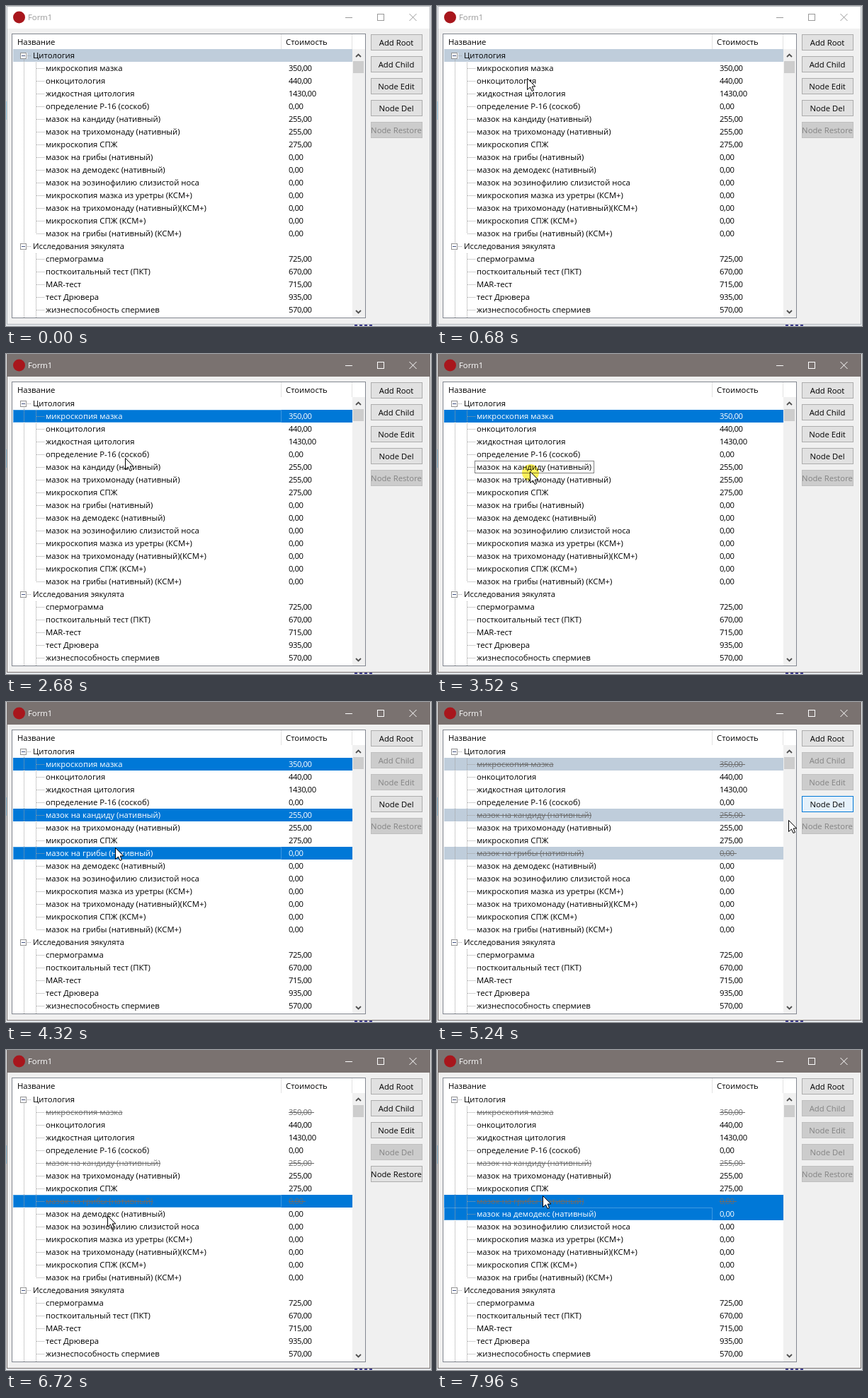
An HTML page with a canvas for the animation above (8 s loop, 600x453 px).

```html
<!DOCTYPE html>
<html lang="ru">
<head>
<meta charset="utf-8">
<title>Form1</title>
<style>
html, body { margin: 0; width: 100%; height: 100%; overflow: hidden; background: #f0f0f0; }
canvas { display: block; }
</style>
</head>
<body>
<canvas id="stage" width="600" height="453"></canvas>
<script>
const ctx = document.getElementById('stage').getContext('2d');
const LOOP = 8000, STEP = 40, HOLD = 80, BLUE = '#0078d7';
const FONT = '500 11.3px "Open Sans", "Noto Sans", sans-serif';

const rows = `Цитология
микроскопия мазка|350,00
онкоцитология|440,00
жидкостная цитология|1430,00
определение Р-16 (соскоб)|0,00
мазок на кандиду (нативный)|255,00
мазок на трихомонаду (нативный)|255,00
микроскопия СПЖ|275,00
мазок на грибы (нативный)|0,00
мазок на демодекс (нативный)|0,00
мазок на эозинофилию слизистой носа|0,00
микроскопия мазка из уретры (КСМ+)|0,00
мазок на трихомонаду (нативный)(КСМ+)|0,00
микроскопия СПЖ (КСМ+)|0,00
мазок на грибы (нативный) (КСМ+)|0,00
Исследования эякулята
спермограмма|725,00
посткоитальный тест (ПКТ)|670,00
MAR-тест|715,00
тест Дрювера|935,00
жизнеспособность спермиев|570,00`.split('\n').map(s => s.split('|'));
const buttons = ['Add Root', 'Add Child', 'Node Edit', 'Node Del', 'Node Restore'];

// Mouse presses; each takes effect on release, HOLD ms later.
const start = { press: -HOLD, rows: [0], blur: true };
const removal = { press: 5000, rows: [1, 5, 8], blur: true };
const acts = [
  start,
  { press: 760, rows: [1] },
  { press: 3520, rows: [1, 5] },
  { press: 4240, rows: [1, 5, 8] },
  removal,
  { press: 5960, rows: [8] },
  { press: 7320, rows: [8, 9] }
];

// Pointer moves: begin, end, x, y, height of the arc
const moves = [
  [360, 720, 128, 90, 0],
  [880, 1080, 143, 147, 0],
  [1960, 2800, 169, 147, 0],
  [2880, 3320, 131, 166, 26],
  [3560, 4080, 134, 214, 0],
  [4240, 4840, 545, 142, 30],
  [5140, 5600, 143, 230, -38],
  [5800, 5960, 146, 213, 0],
  [6120, 6720, 143, 234, 0],
  [7400, 7960, 149, 206, 0]
];

const clamp = k => Math.max(0, Math.min(1, k));
const ease = k => k * k * (3 - 2 * k);
const rowY = i => 70 + 18 * i;

function pointer(t) {
  if (t >= 1080 && t < 1960) { // one sweep around the labels
    const a = (120 + 300 * (t - 1080) / 880) * Math.PI / 180;
    return [158 + 30 * Math.cos(a), 134 + 15 * Math.sin(a)];
  }
  let x = 90, y = 453;
  for (const [t0, t1, toX, toY, arc] of moves) {
    if (t < t0) break;
    const e = ease(clamp((t - t0) / (t1 - t0)));
    x += (toX - x) * e;
    y += (toY - y) * e - arc * Math.sin(Math.PI * e);
  }
  return [x, y];
}

function stateAt(t) {
  const pressed = acts.filter(a => a.press <= t).pop();
  const done = acts.filter(a => a.press + HOLD <= t).pop();
  const removed = t >= removal.press + HOLD ? removal.rows : [];
  const one = done.rows.length === 1;
  const gone = done.press > removal.press && done.rows.some(i => removed.includes(i));
  return {
    t, pressed, done, removed,
    active: pressed !== start,
    lit: !pressed.blur && !done.blur,
    holding: pressed !== done,
    enabled: [true, one, one, !gone, gone && one]
  };
}

function fill(color, x, y, w, h) {
  ctx.fillStyle = color;
  ctx.fillRect(x, y, w, h);
}

function frame(color, x, y, w, h) {
  ctx.strokeStyle = color;
  ctx.strokeRect(x + .5, y + .5, w - 1, h - 1);
}

function line(color, ...pts) {
  ctx.strokeStyle = color;
  ctx.beginPath();
  pts.forEach(([x, y]) => ctx.lineTo(x, y));
  ctx.stroke();
}

function text(s, x, y, color = '#000', align = 'left') {
  ctx.fillStyle = color;
  ctx.textAlign = align;
  ctx.fillText(s, x, y);
}

function dotted(draw) {
  ctx.setLineDash([1, 1]);
  draw();
  ctx.setLineDash([]);
}

function disc(color, x, y, r) {
  ctx.fillStyle = color;
  ctx.beginPath();
  ctx.arc(x, y, r, 0, 7);
  ctx.fill();
}

function drawWindow({ active }) {
  const ink = active ? '#fff' : '#999', bar = active ? '#7a7270' : '#fff';
  fill('#e4e8ec', 0, 0, 600, 453);
  fill('#a9d8f0', 0, 135, 1, 26);
  for (let x = 492; x < 520; x += 7) fill('#404090', x, 451, 4, 2);

  fill('#f0f0f0', 1, 0, 598, 451);
  fill(bar, 1, 0, 598, 32);
  frame(active ? bar : '#b4b8bc', 1, 0, 598, 451);
  disc('#a8161c', 18.5, 16, 8.5);
  text('Form1', 31, 20, ink);
  line(ink, [479, 16.5], [489, 16.5]);
  frame(ink, 524, 11, 10, 10);
  line(ink, [569.5, 11], [579.5, 21]);
  line(ink, [579.5, 11], [569.5, 21]);
}

function drawTreeLines() {
  const gray = '#a0a0a0', roots = [0, 15].map(rowY);
  dotted(() => {
    line(gray, [25.5, 76], [25.5, 441]);
    line(gray, [42.5, 80], [42.5, rowY(14)]);
    line(gray, [42.5, 350], [42.5, 441]);
    rows.forEach(([, price], i) => {
      const x = price ? 43 : 30, y = rowY(i) + .5;
      line(gray, [x, y], [price ? 54 : 36, y]);
    });
  });
  for (const y of roots) {
    fill('#fff', 20, y - 4, 10, 9);
    frame('#919191', 20, y - 4, 9, 9);
    line('#405080', [22, y + .5], [27, y + .5]);
  }
}

function drawRow([name, price], i, color, struck) {
  const y = rowY(i);
  text(name, price ? 56 : 38, y + 4, color);
  if (!price) return;
  ctx.letterSpacing = '-0.4px';
  text(price, 399, y + 4, color);
  ctx.letterSpacing = '0px';
  if (struck) {
    fill(color, 56, y, ctx.measureText(name).width, 1);
    fill(color, 399, y, price.length * 6, 1);
  }
}

function drawScrollbar() {
  fill('#f0f0f0', 489, 61, 18, 380);
  fill('#cdcdcd', 490, 78, 15, 17);
  ctx.lineWidth = 1.8;
  for (const [y, d] of [[72, -3.5], [431, 3.5]]) {
    line('#505050', [494, y], [497.5, y + d], [501, y]);
  }
  ctx.lineWidth = 1;
}

function drawTree({ pressed, done, removed, lit, holding }) {
  fill('#fff', 8, 39, 500, 403);
  frame('#828790', 8, 39, 500, 403);
  text('Название', 16, 55);
  text('Стоимость', 395, 55);
  for (const x of [388, 488]) fill('#e2e2e2', x, 40, 1, 21);

  done.rows.forEach(i => fill(lit ? BLUE : '#bfcddb', 10, rowY(i) - 9, 479, 18));
  drawTreeLines();
  rows.forEach((row, i) => {
    const struck = removed.includes(i);
    const color = struck ? '#6c6c6c' : lit && done.rows.includes(i) ? '#fff' : '#000';
    drawRow(row, i, color, struck);
  });
  const focus = pressed.rows.at(-1);
  if (!pressed.blur) dotted(() => {
    if (holding) frame('#000', 53, rowY(focus) - 9, ctx.measureText(rows[focus][0]).width + 7, 18);
    else frame('#7fbbea', 10, rowY(focus) - 9, 379, 18);
  });
  drawScrollbar();
}

function drawButtons({ t, pressed, enabled }) {
  buttons.forEach((label, i) => {
    const y = 40 + 31 * i, live = enabled[i];
    const focused = i === 3 && pressed === removal;
    const hot = i === 3 && Math.abs(t - removal.press) < 260;
    fill(hot ? '#e5f1fb' : live ? '#e1e1e1' : '#ccc', 515, y, 73, 23);
    frame(hot || focused ? BLUE : live ? '#adadad' : '#bfbfbf', 515, y, 73, 23);
    if (focused && !hot) frame(BLUE, 516, y + 1, 71, 21);
    text(label, 551, y + 16, live ? '#000' : '#838383', 'center');
  });
}

function drawPointer({ t, holding }) {
  if (t < moves[0][0]) return;
  const [x, y] = pointer(t).map(Math.round);
  if (holding) {
    ctx.globalCompositeOperation = 'multiply';
    disc('#fdf05a', x + 1, y + 2, 12);
    ctx.globalCompositeOperation = 'source-over';
  }
  const arrow = [[0, 0], [0, 16], [4, 12.5], [6.5, 18], [9, 17], [6.7, 11.5], [11.3, 11.5]];
  ctx.beginPath();
  arrow.forEach(([dx, dy]) => ctx.lineTo(x + .5 + dx, y + .5 + dy));
  ctx.closePath();
  ctx.fillStyle = '#fff';
  ctx.fill();
  ctx.strokeStyle = '#000';
  ctx.stroke();
}

function draw(now) {
  const state = stateAt(Math.floor(now % LOOP / STEP) * STEP);
  ctx.font = FONT;
  ctx.lineWidth = 1;
  drawWindow(state);
  drawTree(state);
  drawButtons(state);
  drawPointer(state);
  requestAnimationFrame(draw);
}
requestAnimationFrame(draw);
</script>
</body>
</html>
```
